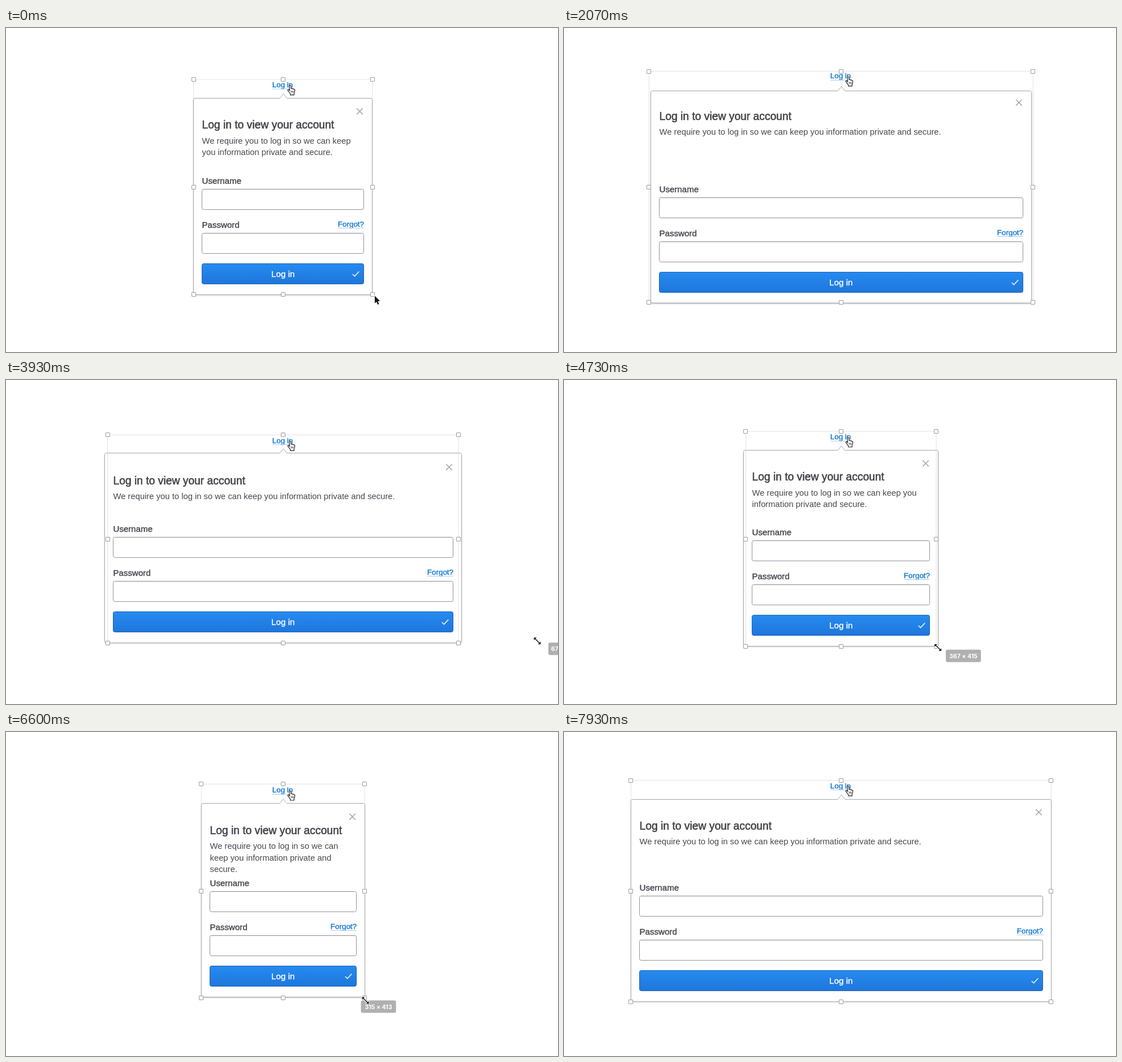
Recreate the animation shown at these times as an HTML page with a canvas. Size 976 by 574 pixels, loop 8 s.

```html
<!DOCTYPE html>
<html lang="en">
<head>
<meta charset="utf-8">
<title>Resizable login popover</title>
<style>
  html, body { margin: 0; width: 100%; height: 100%; overflow: hidden; background: #fff; }
  canvas { display: block; width: 976px; height: 574px; }
</style>
</head>
<body>
<canvas id="stage" width="976" height="574"></canvas>
<script>
const ctx = document.getElementById('stage').getContext('2d');
const LOOP = 8000, CX = 489.8, CY = 281.5;
const SANS = '"Liberation Sans", Arial, sans-serif';
const INK = '#47464e', LINK = '#1b7cd3', BORDER = '#a9a9ad', BLACK = '#151515';
const MESSAGE = 'We require you to log in so we can keep you information private and secure.';
const PANEL_LAG = 30, POINTER_LEAD = 45, MIN_PANEL = 144.5, UNIT = 0.917;
const START = { w: 158, h: 190.5 };

// Eased moves of the selection's half width and half height: [from ms, to ms, value]
const WIDTH_MOVES = [[470, 2440, 358], [3440, 5020, 150], [5130, 6100, 138], [6490, 7600, 371.5]];
const HEIGHT_MOVES = [[540, 1420, 212], [1784, 2700, 181.5], [3440, 4800, 190.5],
  [5130, 6100, 186], [6464, 6910, 200.5], [7100, 7860, 196]];

function follow(moves, value, t) {
  for (const [from, to, goal] of moves) {
    const u = Math.max(0, Math.min(1, (t - from) / (to - from)));
    value += (goal - value) * u * u * (3 - 2 * u);
  }
  return value;
}

const sizeAt = t => ({ w: follow(WIDTH_MOVES, START.w, t), h: follow(HEIGHT_MOVES, START.h, t) });

// The corner is dragged at twice the speed of the half size
const dragOffset = ({ w, h }) => [2 * (w - START.w), 2 * (h - START.h)];

const snap = v => Math.floor(v) + 0.5;

function text(str, x, y, size, color, { bold = 0, align = 'left', font = SANS, weight = 400 } = {}) {
  ctx.font = `${weight} ${size}px ${font}`;
  ctx.textAlign = align;
  ctx.fillStyle = ctx.strokeStyle = color;
  ctx.fillText(str, x, y);
  if (bold) {
    ctx.lineWidth = bold;
    ctx.strokeText(str, x, y);
  }
}

function line(points, color, width, closed, fill) {
  ctx.beginPath();
  points.forEach(([x, y]) => ctx.lineTo(x, y));
  if (closed) ctx.closePath();
  if (fill) { ctx.fillStyle = fill; ctx.fill(); }
  if (color) { ctx.strokeStyle = color; ctx.lineWidth = width; ctx.stroke(); }
}

function box(x, y, w, h, radius, fill, stroke) {
  ctx.beginPath();
  ctx.roundRect(x, y, w, h, radius);
  if (fill) { ctx.fillStyle = fill; ctx.fill(); }
  if (stroke) { ctx.strokeStyle = stroke; ctx.lineWidth = 1; ctx.stroke(); }
}

function link(str, x, y, width, align) {
  text(str, x, y, 13.4, LINK, { bold: 0.45, align });
  const left = align === 'right' ? x - width : x;
  line([[left, y + 3], [left + width, y + 3]], '#a5cdf0', 1);
}

function paragraph(str, x, y, width) {
  ctx.font = `14.8px ${SANS}`;
  const rows = [''];
  for (const word of str.split(' ')) {
    const row = rows.at(-1), next = row ? row + ' ' + word : word;
    if (ctx.measureText(next).width > width) rows.push(word);
    else rows[rows.length - 1] = next;
  }
  rows.forEach((row, i) => text(row, x, y + i * 20.6, 14.8, INK));
}

function field(label, x, y, w) {
  text(label, x, y - 10, 15.1, INK, { bold: 0.45 });
  box(x, y, w, 36, 3, '#fff', '#92929b');
  line([[x + 2, y + 1], [x + w - 2, y + 1]], 'rgba(0,0,0,.06)', 1);
}

function panel({ w, h }) {
  w = Math.max(MIN_PANEL, w);
  const top = CY - h, edge = snap(CY - h * 0.824), bottom = snap(CY + h);
  const left = snap(CX - w), right = snap(CX + w);
  const x = left + 15, end = right - 15, inner = end - x;

  ctx.save();
  ctx.shadowColor = 'rgba(0,0,0,.24)';
  ctx.shadowBlur = 3;
  ctx.shadowOffsetY = 1;
  box(left, edge, right - left, bottom - edge, 3, '#fff');
  ctx.restore();
  box(left, edge, right - left, bottom - edge, 3, '#fff', BORDER);
  line([[484, edge + 0.6], [490.5, edge - 8], [497, edge + 0.6]], BORDER, 1, false, '#fff');
  line([[484.6, edge], [496.4, edge]], '#fff', 1.4);

  link('Log in', 470.8, top + 14, 36.5);
  const cx = right - 22, cy = top + 56.7;
  for (const s of [-1, 1]) line([[cx - 5.3, cy - 5.3 * s], [cx + 5.3, cy + 5.3 * s]], '#a7a8b0', 1.6);
  text('Log in to view your account', x, top + 87.3, 19.3, '#43424a', { bold: 0.6 });
  paragraph(MESSAGE, x, top + 113.7, inner - 5);

  field('Username', x, bottom - 187, inner);
  field('Password', x, bottom - 109, inner);
  link('Forgot?', end + 0.5, bottom - 121, 46, 'right');

  const paint = ctx.createLinearGradient(0, bottom - 55, 0, bottom - 19);
  paint.addColorStop(0, '#268bf0');
  paint.addColorStop(1, '#1f76db');
  box(x, bottom - 55, inner, 36, 3, paint, '#1c64b5');
  text('Log in', CX, bottom - 31.2, 15.2, '#fff', { bold: 0.35, align: 'center' });
  const k = right - 29, m = bottom - 37;
  line([[k - 5.8, m + 0.6], [k - 2, m + 4.2], [k + 5.8, m - 4.2]], '#d3e7fb', 1.7);
}

function handles({ w, h }) {
  ctx.strokeStyle = 'rgba(190,190,190,.45)';
  ctx.lineWidth = 1;
  ctx.strokeRect(CX - w, CY - h, 2 * w, 2 * h);
  for (const i of [-1, 0, 1]) for (const j of [-1, 0, 1]) {
    if (i || j) box(Math.round(CX + i * w) - 3.5, Math.round(CY + j * h) - 3.5, 7, 7, 0.5, '#fff', '#9b9b9b');
  }
}

function at(x, y, draw) {
  ctx.save();
  ctx.translate(x, y);
  draw();
  ctx.restore();
}

const HAND = new Path2D('M3.2 1.6C3.2 0 5.8 0 6 1.6L6.6 6.2C7.4 5.6 8.6 5.8 8.9 6.8C9.8 6.2 11 6.6 11.2 7.6' +
  'C12.4 7.2 13.2 8 13.1 9.2C13 12 12.6 13 11.7 14.6V17.6H5.2V15.6C3.6 13.8 2.6 11.6 .8 9.8' +
  'C0 8.6 1.4 7.6 2.6 8.4L4 9.8Z');

function hand() {
  ctx.fillStyle = '#fff';
  ctx.fill(HAND);
  ctx.strokeStyle = '#222';
  ctx.lineWidth = 1.2;
  ctx.stroke(HAND);
  for (const x of [6.7, 8.5, 10.3]) line([[x, 10.2], [x, 13.4]], '#333', 0.9);
}

function arrow() {
  const outline = [[0, 0], [0, 13.2], [3, 10.4], [5.2, 15.4], [7.6, 14.4], [5.4, 9.5], [9.2, 9.3]];
  line(outline, '#fff', 1.6, true);
  line(outline, null, 0, true, BLACK);
}

function resizer() {
  const heads = [-1, 1].map(s => [[6 * s, 6 * s], [6 * s, 1.2 * s], [1.2 * s, 6 * s]]);
  line([[-5, -5], [5, 5]], '#fff', 3.4);
  heads.forEach(p => line(p, '#fff', 1.6, true));
  line([[-4, -4], [4, 4]], BLACK, 1.5);
  heads.forEach(p => line(p, null, 0, true, BLACK));
}

function sizeLabel(size) {
  const [dx, dy] = dragOffset(size), x = 654.5 + dx, y = 478 + dy;
  box(x, y, 62, 22, 3, '#b0b0b0');
  const label = [size.w, size.h].map(v => Math.round(2 * v / UNIT)).join(' × ');
  text(label, x + 31, y + 15, 10.6, '#fff', { align: 'center', font: 'Inter, sans-serif', weight: 700 });
}

function draw(t) {
  ctx.fillStyle = '#fff';
  ctx.fillRect(0, 0, 976, 574);
  const frame = sizeAt(t), body = sizeAt(t - PANEL_LAG);
  panel(body);
  handles(frame);
  at(497.6, CY - body.h + 10, hand);
  if (t >= 600) sizeLabel(frame);
  const [dx, dy] = dragOffset(sizeAt(t + POINTER_LEAD));
  if (t < 130) at(652, 474.5, arrow);
  else at(650.5 + dx, 474 + dy, resizer);
}

function tick() {
  draw(performance.now() % LOOP);
  requestAnimationFrame(tick);
}
tick();
</script>
</body>
</html>
```
